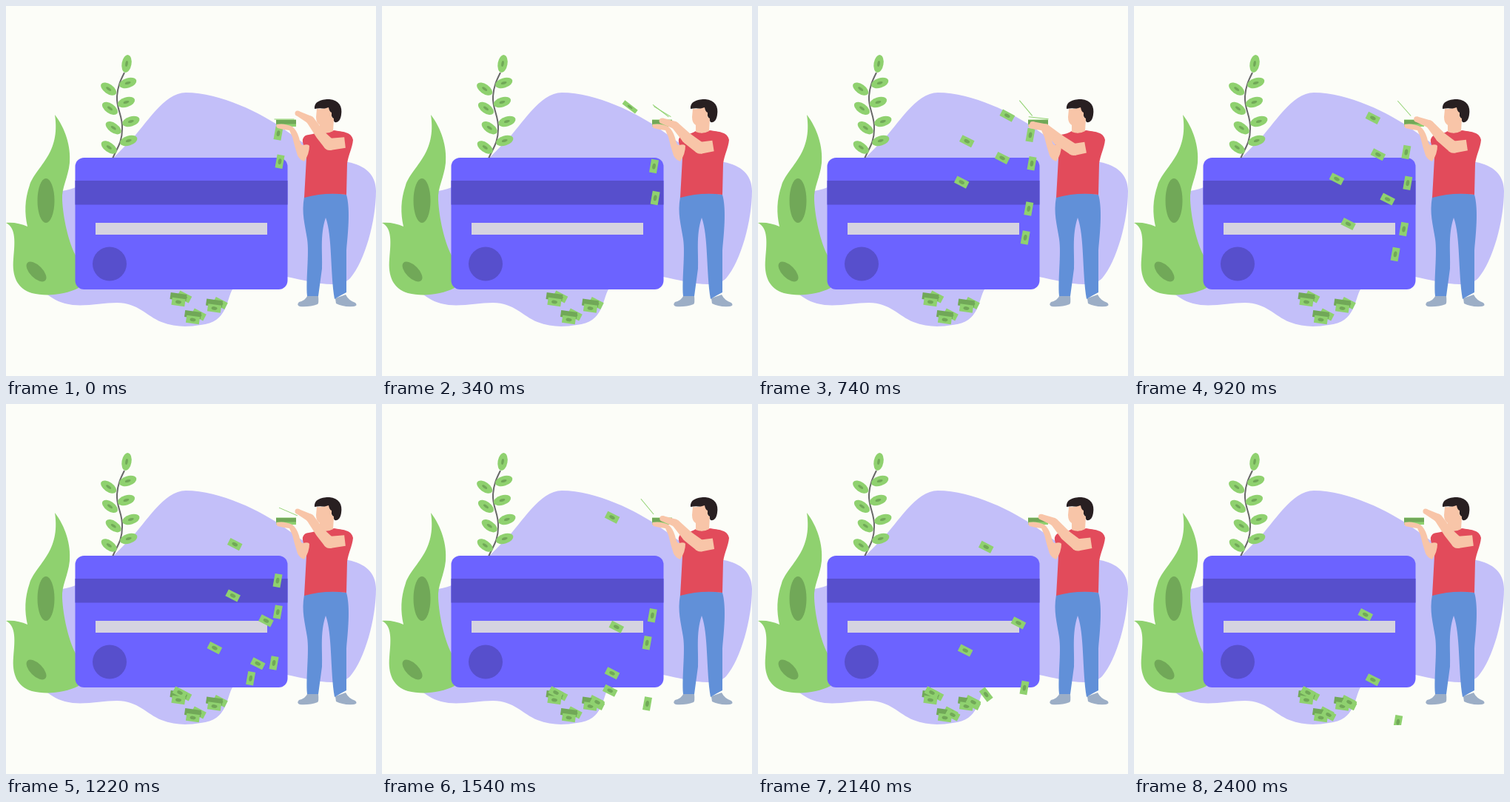
Recreate the animation shown at these times as an HTML page with a canvas. Size 500 px wide and 500 px high, loop 2.42 s.

```html
<!DOCTYPE html>
<html lang="en">
<head>
<meta charset="utf-8">
<title>Card and cash</title>
<style>
html, body { margin: 0; height: 100%; overflow: hidden; background: #fcfdf8; }
canvas { display: block; width: 100vmin; height: 100vmin; }
</style>
</head>
<body>
<canvas id="stage" width="500" height="500"></canvas>
<script>
const ctx = document.getElementById('stage').getContext('2d');
const LOOP = 2420, ARM_PERIOD = 1210, SLIP_PERIOD = 722, TAU = 2 * Math.PI;
const GREEN = '#8fd16f', DARK_GREEN = '#71a858', SKIN = '#f8c5a8';
const PURPLE = '#6c63ff', DARK_PURPLE = '#574fcc';

const clamp = v => Math.max(0, Math.min(1, v));
const mix = (a, b, k) => a + (b - a) * k;
const bezier = (a, b, c, d, k) =>
  mix(mix(mix(a, b, k), mix(b, c, k), k), mix(mix(b, c, k), mix(c, d, k), k), k);

function shape(color, d) {
  ctx.fillStyle = color;
  ctx.fill(new Path2D(d));
}

function rect(color, x, y, w, h, r = 0) {
  ctx.fillStyle = color;
  ctx.beginPath();
  ctx.roundRect(x, y, w, h, r);
  ctx.fill();
}

function oval(color, x, y, rx, ry, deg = 0) {
  ctx.fillStyle = color;
  ctx.beginPath();
  ctx.ellipse(x, y, rx, ry, deg * Math.PI / 180, 0, TAU);
  ctx.fill();
}

function bill(x, y, deg, w = 18, h = 10, color = GREEN) {
  ctx.save();
  ctx.translate(x, y);
  ctx.rotate(deg * Math.PI / 180);
  rect(color, -w / 2, -h / 2, w, h);
  if (h > 3) oval(DARK_GREEN, 0, 0, 4, h * 0.23);
  ctx.restore();
}

function leaf(x, y, deg) {
  oval(GREEN, x, y, 12, 6.5, deg);
  oval(DARK_GREEN, x, y, 4, 1.7, deg);
}

// Tapered limb through [x, y, radius] joints, cut flat at the last one.
function limb(color, joints) {
  joints.slice(1).forEach(([x2, y2, r2], i) => {
    const [x1, y1, r1] = joints[i];
    const len = Math.hypot(x2 - x1, y2 - y1), nx = (y1 - y2) / len, ny = (x2 - x1) / len;
    oval(color, x1, y1, r1, r1);
    ctx.beginPath();
    ctx.moveTo(x1 + nx * r1, y1 + ny * r1);
    ctx.lineTo(x2 + nx * r2, y2 + ny * r2);
    ctx.lineTo(x2 - nx * r2, y2 - ny * r2);
    ctx.lineTo(x1 - nx * r1, y1 - ny * r1);
    ctx.fill();
  });
}

// Each throw sends one bill down each of these routes, swaying like a leaf.
const routes = [
  { delay: 0, from: [326, 141], to: [235, 390], open: 350, land: 1160, sway: 28, bow: 0, sag: -11 },
  { delay: 170, from: [333, 155], to: [291, 403], open: 370, land: 1190, sway: 17, bow: 37, sag: 3 },
  { delay: 485, from: [323, 151], to: [263, 420], open: 395, land: 1200, sway: 20, bow: 22, sag: 8 }
];
const throwTimes = [40, 235, 1145];

function drawThrown({ from: [x0, y0], to: [x1, y1], open, land, sway, bow, sag }, u) {
  if (u < -40) return;
  if (u < open) {
    const k = clamp(u / open), unfold = clamp((u - 250) / 90);
    const spin = 51 * Math.sin(clamp(u / 250) * Math.PI / 2);
    bill(bezier(376, 400, 343, x0, k), bezier(153, 142, 126, y0, k),
      mix(spin, 27, unfold), mix(27, 18, unfold), mix(1, 10, unfold));
    return;
  }
  const k = clamp((u - open) / (land - open)), arc = Math.sin(k * Math.PI);
  bill(mix(x0, x1, k) + bow * arc - sway * Math.sin(k * TAU), mix(y0, y1, k) + sag * arc, 27);
}

// Two bills slip off the stack: one drops, the other drifts to the pile.
function drawSlipping(u) {
  if (u < -100) return;
  const height = 10 * clamp((u + 100) / 60);
  bill(368 - 4e-6 * u * u, 172 + 0.125 * u + 1.7e-5 * u * u, 100, 18, height);
  const v = Math.min(u, 1540);
  bill(370 - 79 * (v / 1540) ** 3, 210 + 0.15 * v - 1.5e-5 * v * v,
    mix(100, 27, clamp((v - 1230) / 290)), 18, height);
}

function drawScene() {
  shape('#c3bff9', `M243 117C290 117 345 145 375 166C410 190 425 206 462 211
    C485 215 500 228 500 250C500 290 485 345 465 368C450 384 410 372 380 366L306 383
    C298 395 300 428 263 431C245 434 228 434 210 427C190 419 178 401 150 401
    C130 401 110 406 90 404C75 402 65 397 56 390L76 250C110 245 128 222 168 182
    C188 162 213 117 243 117Z`);
  shape(GREEN, `M66 147C80 165 88 190 86 212C84 232 75 245 76 262C77 285 84 318 94 337
    L98 381C80 390 55 393 35 388C15 382 8 365 10 342C12 320 14 300 0 293
    C10 292 20 294 29 298C25 280 25 262 32 242C42 215 74 200 66 147Z`);
  oval(DARK_GREEN, 54, 263, 11.5, 30);
  oval(DARK_GREEN, 41, 359, 17, 8.5, 45);

  ctx.strokeStyle = '#686868';
  ctx.lineWidth = 2;
  ctx.stroke(new Path2D('M144 206C150 192 157 185 157 166C158 148 149 140 150 122C151 108 155 100 160 90'));
  const stemX = y => 153.5 + 3.8 * Math.sin((y - 142) / 13);
  for (let i = 0; i < 4; i++) {
    const right = 182 - 26 * i, left = 191 - 26.3 * i;
    leaf(stemX(right) + 12, right, -17);
    leaf(stemX(left) - 12, left, 35);
  }
  leaf(163, 78, -80);

  rect(PURPLE, 93.5, 205, 287, 178, 12);
  rect(DARK_PURPLE, 93.5, 236, 287, 32.5);
  rect('#d5d3e0', 121, 293, 232, 16);
  oval(DARK_PURPLE, 140, 348.5, 23, 23);

  for (const [x, y] of [[233, 400], [281.5, 408.5], [252.5, 424]]) {
    bill(x + 8, y - 7, 27);
    bill(x, y - 7, 8, 22, 9, DARK_GREEN);
    bill(x, y, 8);
  }
}

function drawBody() {
  shape('#9caec6', `M408 390L422 392Q423 402 421 403Q410 407 397 406Q392 404 396 400Q405 398 408 390Z
    M445 395L459 390Q463 398 472 401Q476 405 470 406Q455 407 446 402Z`);
  shape('#6190d8', `M403 258Q430 250 460 255C465 272 463 300 460 330L460 387Q452 391 444 396
    C438 360 441 310 432 286C424 310 428 335 427 355L422 392Q415 392 407 392
    C405 370 410 335 407 315C404 295 399 280 403 258Z`);
  shape('#e24b5b', `M424 169Q433 174 443 168C455 170 467 170 469 181C468 192 463 200 461 213
    L460 255Q432 251 403 259L406 205C404 190 400 186 401 180Q403 174 409 174Q418 173 424 169Z`);
  shape('#281f21', `M417 139C416 128 428 126 437 126C450 127 455 136 453 147
    C452 154 449 158 444 157L436 140Q426 137 417 139Z`);
  shape(SKIN, `M420 139Q428 140 436 137Q437 143 440 144L440 150L443 152L442 169
    Q433 174 424 170L424 161Q419 158 419 150Z`);
}

// Throwing arm from fingertips to sleeve.
const armUp = [[394, 145, 3.5], [411, 154, 5.5], [425, 174, 6.5], [437, 187, 8], [458, 184.5, 7.2]];
const armOut = [[368, 162, 4], [386, 166, 5], [404, 182, 8], [425, 195, 8], [440.5, 192, 7.5]];

function drawArms(t) {
  rect(GREEN, 365, 153.5, 27, 9.5);
  rect(DARK_GREEN, 365, 154, 27, 5.5);
  shape(SKIN, `M366 160Q376 158 387 163Q393 168 396 178Q398 188 401 188Q409 186 410 189
    Q410 200 403 210Q396 207 394 202Q390 190 387 177L383 168Q374 167 367 165Q364 162 366 160Z`);
  const reach = (1 - Math.cos(t / ARM_PERIOD * TAU)) / 2;
  limb(SKIN, armUp.map((joint, i) => joint.map((v, axis) => mix(v, armOut[i][axis], reach))));
}

function draw(t) {
  rect('#fcfdf8', 0, 0, 500, 500);
  drawScene();
  ctx.save();
  ctx.beginPath();
  ctx.rect(0, 0, 500, 434);
  ctx.clip();
  drawSlipping(t);
  drawSlipping(t - SLIP_PERIOD);
  for (const start of throwTimes)
    for (const route of routes) drawThrown(route, t - start - route.delay);
  ctx.restore();
  drawBody();
  drawArms(t);
}

const begin = performance.now();
function tick() {
  draw((performance.now() - begin) % LOOP);
  requestAnimationFrame(tick);
}
tick();
</script>
</body>
</html>
```
